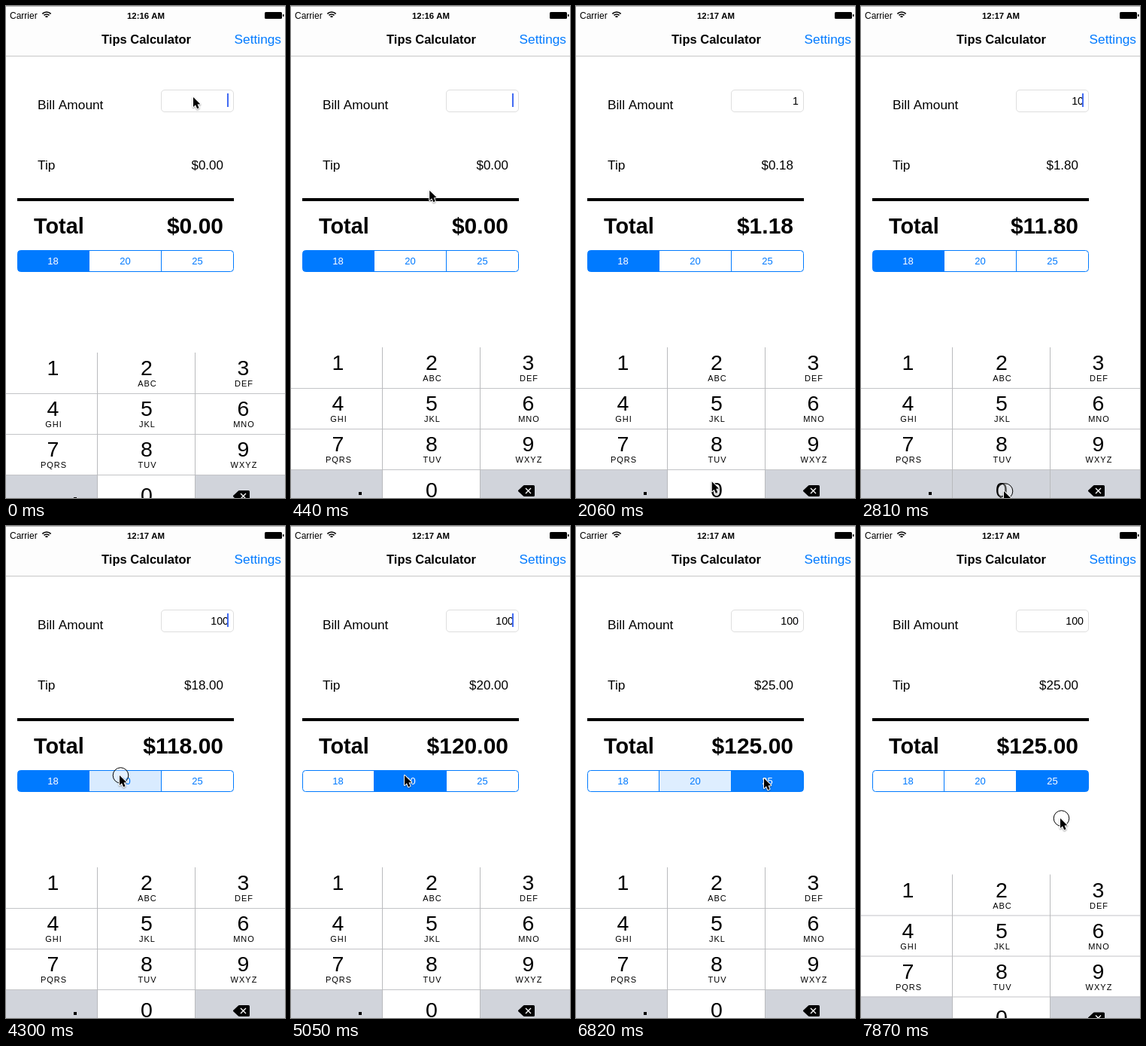
An HTML page with a canvas that plays this animation: 371x653 px, repeating every 8 s.

```html
<!DOCTYPE html>
<html lang="en">
<head>
<meta charset="utf-8">
<title>Tips Calculator</title>
<style>
  html, body { margin: 0; width: 371px; height: 653px; overflow: hidden; background: #fff; }
  canvas { display: block; }
</style>
</head>
<body>
<canvas id="stage" width="371" height="653"></canvas>
<script>
const ctx = document.getElementById('stage').getContext('2d');
const LOOP = 8000, TICK = 148.3, LAST_TICK = 53;
const BLUE = '#007aff', KEY_GRAY = '#d1d4db';

const pointerPath = [
  [0, 249, 120], [1, 249, 120], [6, 65, 472], [8, 65, 472], [14, 190, 643], [21, 190, 643],
  [24, 153, 333], [25, 153, 333], [27, 151, 330], [36, 151, 330], [40, 250, 334],
  [46, 250, 334], [50, 265, 387]
];
const clicks = [7, 15, 19, 29, 45, 53];
const pressedKeys = { 7: '1', 15: '0', 19: '0' };
const bills = [[0, ''], [8, '1'], [16, '10'], [20, '100']];
const tipRates = [[0, 18], [30, 20], [46, 25]];
const segmentFills = [
  [0, [1, 0, 0]], [29, [1, .15, 0]], [30, [.13, .95, 0]], [31, [0, 1, 0]],
  [45, [0, 1, .15]], [46, [0, .13, .96]], [47, [0, 0, 1]]
];
const keyboardDrops = [[0, 7], [1, 1], [2, 0], [53, 9.5]];
const letters = ['', 'ABC', 'DEF', 'GHI', 'JKL', 'MNO', 'PQRS', 'TUV', 'WXYZ'];

const entryAt = (list, tick) => list.filter(([start]) => start <= tick).pop();
const valueAt = (list, tick) => entryAt(list, tick)[1];

function pointerAt(tick) {
  const i = pointerPath.findIndex(([start]) => start > tick);
  if (i < 0) return pointerPath[pointerPath.length - 1].slice(1);
  const [t0, x0, y0] = pointerPath[i - 1], [t1, x1, y1] = pointerPath[i];
  const u = (tick - t0) / (t1 - t0), ease = u * u * (3 - 2 * u);
  return [x0 + (x1 - x0) * ease, y0 + (y1 - y0) * ease];
}

function rect(x, y, w, h, color) {
  ctx.fillStyle = color;
  ctx.fillRect(x, y, w, h);
}

function text(str, x, y, size, { align = 'left', color = '#000', bold = false, spacing = 0 } = {}) {
  ctx.font = `${bold ? 'bold ' : ''}${size}px "Liberation Sans", Arial, sans-serif`;
  ctx.letterSpacing = spacing + 'px';
  ctx.textAlign = align;
  ctx.fillStyle = color;
  ctx.fillText(str, x, y);
}

function polygon(points) {
  ctx.beginPath();
  points.forEach(([x, y]) => ctx.lineTo(x, y));
  ctx.closePath();
}

function roundBox(x, y, w, h, r) {
  ctx.beginPath();
  ctx.roundRect(x, y, w, h, r);
}

function drawHeader(tick) {
  rect(0, 0, 371, 66, '#fdfdfd');
  rect(0, 0, 371, 1, '#b4b4b4');
  rect(0, 66, 371, 1, '#c8c8c8');
  text('Carrier', 5, 16.5, 12);
  ctx.strokeStyle = '#000';
  ctx.lineWidth = 1.7;
  for (const r of [2, 5, 8]) {
    ctx.beginPath();
    ctx.arc(54, 16, r, -Math.PI * .75, -Math.PI * .25);
    ctx.stroke();
  }
  text(tick < 12 ? '12:16 AM' : '12:17 AM', 186, 16.5, 11.4, { align: 'center', bold: true });
  ctx.fillStyle = '#000';
  roundBox(344, 8, 23, 9, 1.5);
  ctx.fill();
  rect(368, 11, 1.5, 3, '#000');
  text('Tips Calculator', 186.5, 50, 16.5, { align: 'center', bold: true });
  text('Settings', 366, 50, 17.3, { align: 'right', color: BLUE });
}

function caretOpacity(tick) {
  if (tick > 51) return 0;
  const [start] = entryAt(bills, tick);
  const phase = (tick - start) * TICK % 1000 / 1000;
  if (phase < .45) return 1;
  return Math.max(0, 1 - (phase - .45) / .15, (phase - .85) / .15);
}

function drawForm(tick) {
  const bill = valueAt(bills, tick);
  const tip = bill * valueAt(tipRates, tick) / 100;
  const right = { align: 'right' };

  text('Bill Amount', 42, 136.5, 17.3);
  ctx.strokeStyle = '#dedede';
  ctx.lineWidth = 1;
  roundBox(206.5, 111.5, 96, 29, 4.5);
  ctx.stroke();
  text(bill, 296, 131, 14.2, right);
  ctx.globalAlpha = caretOpacity(tick);
  rect(294, 116, 2, 18, '#426bf2');
  ctx.globalAlpha = 1;

  text('Tip', 42, 216.5, 17.3);
  text('$' + tip.toFixed(2), 289, 216.5, 17, right);
  rect(15, 255, 288, 4, '#000');
  text('Total', 37, 302, 28.8, { bold: true });
  text('$' + (+bill + tip).toFixed(2), 289, 302, 30, { align: 'right', bold: true });
}

function drawSegments(tick) {
  ctx.save();
  roundBox(15.5, 324.5, 287, 28, 4);
  ctx.clip();
  valueAt(segmentFills, tick).forEach((fill, i) => {
    ctx.globalAlpha = fill;
    rect(15 + 96 * i, 324, 96, 29, BLUE);
    ctx.globalAlpha = 1;
    text([18, 20, 25][i], 62.5 + 96 * i, 343, 13, { align: 'center', color: fill > .5 ? '#fff' : BLUE });
  });
  rect(110, 324, 1, 29, BLUE);
  rect(206, 324, 1, 29, BLUE);
  ctx.restore();
  ctx.strokeStyle = BLUE;
  ctx.lineWidth = 1;
  roundBox(15.5, 324.5, 287, 28, 4);
  ctx.stroke();
}

function drawKeyboard(tick) {
  const pressed = pressedKeys[tick];
  const centers = [62.5, 187, 315.5];
  ctx.save();
  ctx.translate(0, valueAt(keyboardDrops, tick));
  rect(0, 453, 371, 200, '#fff');
  rect(0, 615, 121, 54, KEY_GRAY);
  rect(252, 615, 119, 54, KEY_GRAY);
  if (pressed === '1') rect(0, 453, 121, 54, KEY_GRAY);
  if (pressed === '0') rect(122, 615, 129, 54, KEY_GRAY);
  for (const y of [507, 561, 615]) rect(0, y, 371, 1, '#c3c4c7');
  for (const x of [121, 251]) rect(x, 453, 1, 200, '#b9babd');

  letters.forEach((label, i) => {
    const x = centers[i % 3], y = 453 + 54 * Math.floor(i / 3);
    text(i + 1, x, y + 30, 28.5, { align: 'center' });
    text(label, x + 1, y + 45, 11, { align: 'center', spacing: 1 });
  });
  text('0', 187, 652, 28.5, { align: 'center' });
  rect(90, 645, 4, 4, '#000');

  ctx.fillStyle = ctx.strokeStyle = '#000';
  ctx.lineJoin = 'round';
  ctx.lineWidth = 3;
  polygon([[303.5, 643.5], [310, 637.5], [322.5, 637.5], [322.5, 649.5], [310, 649.5]]);
  ctx.fill();
  ctx.stroke();
  ctx.strokeStyle = '#fff';
  ctx.lineWidth = 1.4;
  ctx.beginPath();
  ctx.moveTo(312, 640); ctx.lineTo(319, 647);
  ctx.moveTo(319, 640); ctx.lineTo(312, 647);
  ctx.stroke();
  ctx.restore();
}

function drawPointer(tick) {
  const [x, y] = pointerAt(tick);
  ctx.save();
  ctx.translate(x, y);
  if (clicks.includes(tick)) {
    ctx.beginPath();
    ctx.arc(1.5, 1, 10.3, 0, 2 * Math.PI);
    ctx.fillStyle = 'rgba(255,255,255,.3)';
    ctx.fill();
    ctx.strokeStyle = '#000';
    ctx.lineWidth = 1;
    ctx.stroke();
  }
  polygon([[0, 1], [0, 14], [3, 11.3], [5.2, 16.3], [7.6, 15.2], [5.5, 10.5], [9.3, 10.2]]);
  ctx.lineJoin = 'round';
  ctx.lineWidth = 2;
  ctx.strokeStyle = '#fff';
  ctx.shadowColor = 'rgba(0,0,0,.4)';
  ctx.shadowBlur = 2;
  ctx.shadowOffsetY = 1;
  ctx.stroke();
  ctx.shadowColor = 'transparent';
  ctx.fillStyle = '#000';
  ctx.fill();
  ctx.restore();
}

function draw() {
  const time = performance.now() % LOOP;
  const tick = Math.min(LAST_TICK, Math.floor((time + 13) / TICK));
  rect(0, 0, 371, 653, '#fff');
  drawHeader(tick);
  drawForm(tick);
  drawSegments(tick);
  drawKeyboard(tick);
  drawPointer(tick);
  requestAnimationFrame(draw);
}
draw();
</script>
</body>
</html>
```
